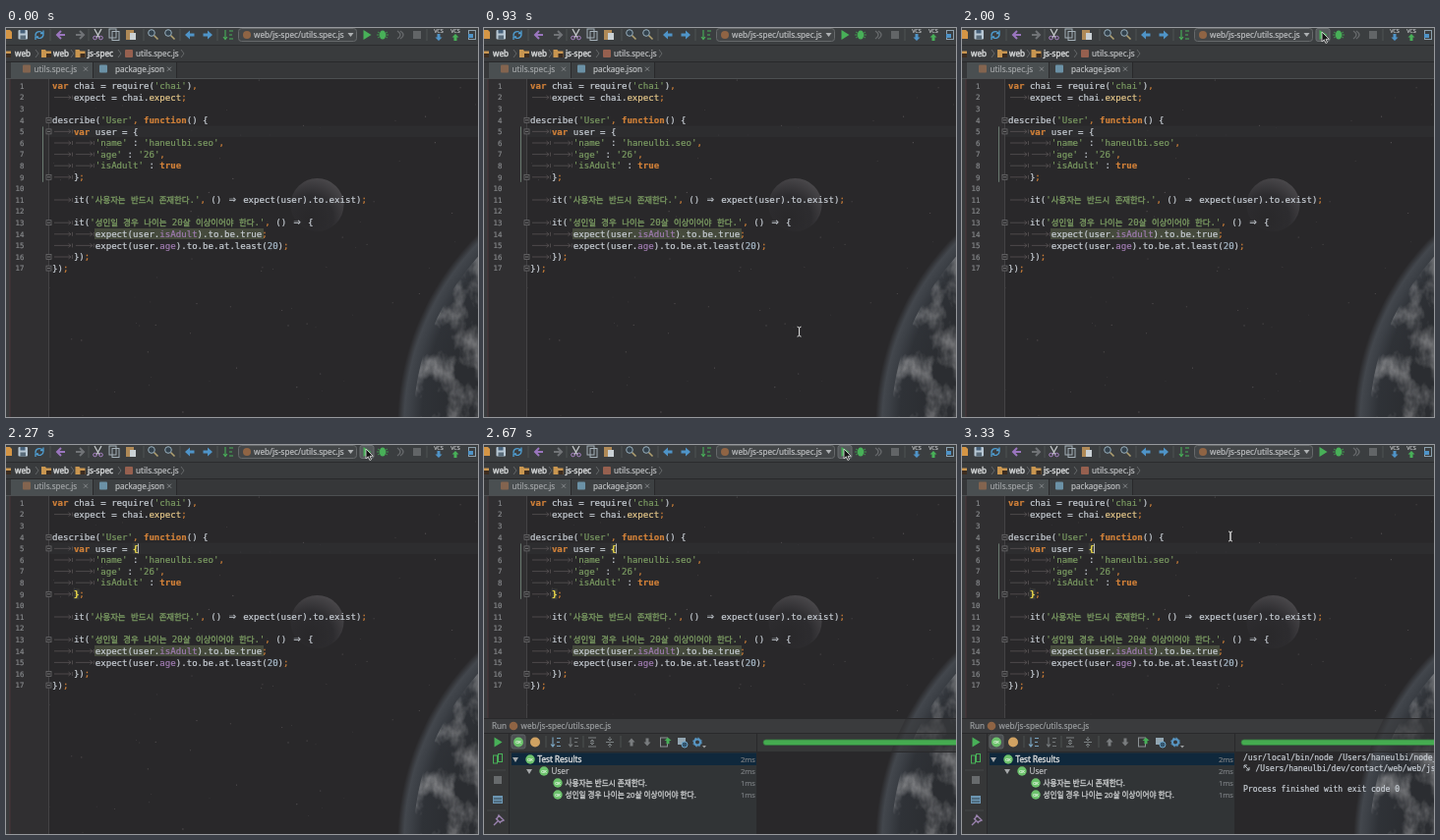
Recreate the animation shown at these times as an HTML page. Size 480 px wide and 396 px high, loop 3390 ms.

```html
<!DOCTYPE html>
<html lang="ko">
<head>
<meta charset="utf-8">
<title>Running a test from the editor</title>
<style>
  html, body { margin: 0; height: 100%; overflow: hidden; background: #29282a; }
  svg { display: block; width: 480px; height: 396px; }
  svg svg { width: auto; height: auto; }
  text { white-space: pre; font: 8.15px "Noto Sans", "Noto Sans CJK KR", "Noto Sans CJK JP", sans-serif; color: #bcbec0; }
  text, tspan { fill: currentColor; stroke: currentColor; stroke-width: .2; }
  .code { font: 9.09px "DejaVu Sans Mono", "Noto Sans CJK KR", "Noto Sans CJK JP", monospace; color: #c8ced5; }
  .out { font-size: 8px; }
  .num { font-size: 7.4px; color: #85878a; text-anchor: end; }
  .strong { stroke-width: .45; color: #d2d4d5; }
  .dim { color: #999c9e; }
  .ko { font-size: 7.65px; stroke-width: .3; color: #c8cacb; }
  .ms { font-size: 7.6px; color: #777b7e; text-anchor: end; }
  .mini { font-size: 4px; color: #e4f3e2; text-anchor: middle; }
  .vcs { font-size: 5.5px; text-anchor: middle; }
  .match { color: #f2df4b; font-weight: bold; }
  .k { color: #d08039; font-weight: bold; }
  .o { color: #d08039; }
  .s { color: #7b9b62; }
  .f { color: #e6c88a; }
  .p { color: #a07cb2; }
  .n { color: #a9bccb; }
  .h { font-size: 8.4px; stroke-width: .3; }
</style>
</head>
<body>
<svg id="stage" viewBox="0 0 480 396">
  <defs>
    <radialGradient id="moon" cx=".36" cy=".76" r=".8">
      <stop offset="0" stop-color="#29282a"/><stop offset=".55" stop-color="#2d2c2f"/><stop offset="1" stop-color="#4a484b"/>
    </radialGradient>
    <radialGradient id="planet" gradientUnits="userSpaceOnUse" cx="672" cy="405" r="274">
      <stop offset=".8" stop-color="#2b2d31"/><stop offset=".91" stop-color="#2f3237"/>
      <stop offset=".95" stop-color="#3c4046"/><stop offset=".975" stop-color="#43474d"/>
      <stop offset="1" stop-color="#29282a"/>
    </radialGradient>
    <filter id="clouds" x="0" y="0" width="1" height="1">
      <feTurbulence type="fractalNoise" baseFrequency=".045 .03" numOctaves="4" seed="5"/>
      <feColorMatrix values="0 0 0 0 .46  0 0 0 0 .46  0 0 0 0 .47  2.6 0 0 0 -1.15"/>
    </filter>
    <clipPath id="disc"><circle cx="672" cy="405" r="258"/></clipPath>
  </defs>
</svg>
<script>
const stage = document.getElementById('stage');
const LOOP = 3390, STEP = 200 / 3, CELL = 5.47;

const rect = (x, y, w, h, fill, extra = '') =>
  `<rect x="${x}" y="${y}" width="${w}" height="${h}" fill="${fill}" ${extra}/>`;
const dot = (x, y, r, fill, extra = '') => `<circle cx="${x}" cy="${y}" r="${r}" fill="${fill}" ${extra}/>`;
const text = (x, y, str, cls = '') => `<text x="${x}" y="${y}" class="${cls}">${str}</text>`;
const fillPath = (d, fill) => `<path d="${d}" fill="${fill}"/>`;
const line = (d, color, w = 1) => `<path d="${d}" fill="none" stroke="${color}" stroke-width="${w}"/>`;
const group = (id, body) => `<g id="${id}">${body}</g>`;
const crop = (x, y, w, h, body) =>
  `<svg x="${x}" y="${y}" width="${w}" height="${h}" style="width:${w}px;height:${h}px" viewBox="${x} ${y} ${w} ${h}">${body}</svg>`;
const rowY = n => 59 + (n - 1) * 11.6;

// Tokens are split by | and start with a one-letter style.
function code(n, indent, src) {
  const spans = src.split('|').map(tok => {
    const body = tok.slice(1)
      .replace(/[가-힣]+/g, '<tspan class="h">$&</tspan>')
      .replace('⇒ ', '<tspan dx="1.9" font-size="12">⇒</tspan><tspan dx="1.8"> </tspan>');
    return `<tspan class="${tok[0]}">${body}</tspan>`;
  }).join('');
  let marks = '';
  for (let i = 0; i < indent; i++) {
    const x = 47 + i * 4 * CELL, y = rowY(n);
    marks += line(`M${x + 2} ${y}h17M${x + 16.5} ${y - 2}l2.5 2l-2.5 2M${x + 20.5} ${y - 2}v4`, '#5d5859', .7);
  }
  return marks + text(47 + indent * 4 * CELL, rowY(n) + 3.1, spans, 'code');
}

function stars() {
  let seed = 7, out = '';
  const rnd = () => (seed = seed * 16807 % 2147483647) / 2147483647;
  for (let i = 0; i < 90; i++)
    out += dot((44 + rnd() * 436).toFixed(1), (52 + rnd() * 344).toFixed(1), (.3 + rnd() * .35).toFixed(2), '#6b6567', 'opacity=".7"');
  return out;
}

const planet = dot(672, 405, 274, 'url(#planet)') +
  `<g clip-path="url(#disc)">${rect(400, 190, 80, 206, '#777', 'filter="url(#clouds)" opacity=".6"')}</g>`;

const folder = (x, y) => fillPath(`M${x} ${y}h4l1 1.5h5v6.5h-10z`, '#c99650') + rect(x + 5, y + 4, 5, 4, '#3d2d20');
const fileIcon = (x, y, color) => rect(x, y, 8, 8, color, 'rx="1"');
const chevron = (x, y) => line(`M${x} ${y - 4}l3 4l-3 4`, '#696c6e', .9);
const cross = (x, y) => line(`M${x - 2} ${y - 2}l4 4m0-4l-4 4`, '#8b8e90', .9);
const play = (x, y) => fillPath(`M${x - 3.5} ${y - 5}l8 5l-8 5z`, '#48b058');
const arrowL = (x, y, c) => fillPath(`M${x - 5} ${y}l5-4.5v3h4.5v3h-4.5v3z`, c);
const arrowR = (x, y, c) => fillPath(`M${x + 5} ${y}l-5-4.5v3h-4.5v3h4.5v3z`, c);
const arrowV = (x, y, s, c) => fillPath(`M${x} ${y + 4 * s}l-3.5 ${-4 * s}h2v${-4 * s}h3v${4 * s}h2z`, c);
const page = (x, y, c) => rect(x - 3.5, y - 4.5, 7, 9, 'none', `stroke="${c}"`);
const lens = (x, y) => line(`M${x + 1.5} ${y + 1.5}l4 4`, '#b0a070', 1.6) + dot(x - 1, y - 1, 3.3, '#33424d', 'stroke="#9ab0bd"');
const sep = (x, y) => line(`M${x} ${y - 6}v12`, '#55585a', .8);
const ring = (x, y, c) => line(`M${x - 4} ${y + 1}a4 4 0 0 1 7-3m1 1a4 4 0 0 1-7 3M${x + 4} ${y - 4.5}v3.2h-3M${x - 4} ${y + 5}v-3h3`, c, 1.3);
const sorter = (x, y, c) => line(`M${x - 3} ${y - 5}v9m-2-2l2 2.5l2-2.5M${x + 1} ${y - 4}h4M${x + 1} ${y}h3M${x + 1} ${y + 4}h4`, c, 1.1);
const bug = (x, y) => line(`M${x - 5} ${y - 3}l10 6m0-6l-10 6m-1-3h12`, '#3f944c', 1) + `<ellipse cx="${x}" cy="${y}" rx="3" ry="4.5" fill="#48b058"/>`;
const ok = (x, y, r = 4.7) => dot(x, y, r, '#6cc26c') + text(x, y + 1.5, 'OK', 'mini');
const vcs = (x, arrow) => text(x, 5, 'VCS', 'vcs') + arrow;

const toolbar = rect(0, 0, 480, 18, '#3b3e40') + line('M0 17.5h480', '#2b2c2e') +
  fillPath('M0 2h4l2 2v7h-6z', '#d49545') +
  rect(12.5, 2, 9.5, 9.5, '#b8c8d4', 'rx="1"') + rect(14.5, 2, 5, 3.5, '#47617a') + rect(14.5, 7.5, 5.5, 4, '#596b79') +
  ring(34, 7, '#4f9dd0') + sep(45, 7) +
  line('M53 7h7m-4-4l-4 4l4 4', '#9a75be', 2) + line('M78 7h-7m4-4l4 4l-4 4', '#707376', 2) + sep(84, 7) +
  line('M90 1l5 9m2-9l-5 9', '#c4c8ca', 1.3) + dot(90.5, 10, 1.8, 'none', 'stroke="#a882c4"') + dot(96.5, 10, 1.8, 'none', 'stroke="#a882c4"') +
  page(108.5, 5.5, '#a4b0b8') + page(111.5, 8, '#a4b0b8') +
  rect(122, 2, 8, 10, '#b08a57') + rect(126, 5, 6, 7, '#cad1d5') + sep(140, 7) +
  lens(149, 6) + lens(166, 6) + sep(177, 7) +
  arrowL(187, 7, '#4f94c8') + arrowR(205, 7, '#4f94c8') + sep(215, 7) +
  sorter(226, 7, '#48b058') +
  rect(236.5, .5, 120, 13, '#434648', 'rx="3" stroke="#66696b"') + dot(245, 7, 4, '#8f6444') +
  text(252, 9.8, 'web/js-spec/utils.spec.js') + fillPath('M347.5 5h6l-3 4z', '#aeb1b3') +
  group('hover', rect(360, .5, 14, 13, '#55595b', 'rx="2" stroke="#6b6f71"')) +
  play(367, 7) + bug(383, 7) +
  line('M398 3q6 4 0 8m3-8q6 4 0 8', '#66696b', 1.4) + rect(414, 3, 8, 8, '#626567') + sep(428, 7) +
  vcs(440, arrowV(440, 9.5, .9, '#4f94c8')) + vcs(457, arrowV(457, 9.5, -.9, '#48b058')) +
  page(474, 7, '#8ba0ad') + rect(470, 6, 5, 4, '#4f94c8');

const crumbs = rect(0, 18, 480, 17, '#393b3d') + line('M0 34.5h480', '#28292b') +
  folder(-5, 22) + text(9, 29.2, 'web', 'strong') + chevron(30, 26) +
  folder(36, 22) + text(48, 29.2, 'web', 'strong') + chevron(66, 26) +
  folder(70.5, 22) + text(83, 29.2, 'js-spec', 'strong') + chevron(114, 26) +
  fileIcon(121, 22, '#96604f') + text(132, 29.2, 'utils.spec.js') + chevron(178, 26);

const tabs = rect(0, 35, 480, 17, '#363739') + rect(5, 35, 83, 17, '#4a4f51') + rect(89, 35, 84, 17, '#3d4042') +
  line('M88.5 35v17M173.5 35v17', '#29292b') + line('M0 51.5h480', '#4c4f51') +
  fileIcon(17, 37.5, '#83644f') + `<g opacity=".75">${text(28.5, 44.7, 'utils.spec.js')}</g>` + cross(81, 41.7) +
  fileIcon(95, 37.5, '#6b91a6') + text(111, 44.7, 'package.json') + cross(166, 41.7);

let gutter = rect(0, 52, 44, 344, '#302f31') + rect(0, 52, 4, 344, '#393b3d') + line('M4 52v344', '#54373a', .8) +
  line('M43.5 52v344', '#4b4a4b', .8);
for (let n = 1; n <= 17; n++) gutter += text(18.5, rowY(n) + 2.7, n, 'code num');
for (const n of [4, 5, 9, 13, 16, 17])
  gutter += rect(41, rowY(n) - 2.5, 5, 5, '#2d2c2e', 'stroke="#727274" stroke-width=".7"') + line(`M42 ${rowY(n)}h3`, '#929294', .7);

const scope = line(`M37.5 ${rowY(5) - 5}V${rowY(9) + 5}`, '#6b7a70');

const editor = rect(44, 52, 436, 344, '#29282a') + stars() + dot(316.5, 180, 27, 'url(#moon)') + planet +
  rect(44, 99.5, 436, 11.6, '#303032', 'opacity=".7"') + gutter +
  rect(90, 204, 172, 11, '#454a3c') +
  code(1, 0, "kvar |wchai = require(|s'chai'|w)|o,") +
  code(2, 1, 'wexpect = chai.|fexpect|o;') +
  code(4, 0, "wdescribe(|s'User'|o, |kfunction|w() {") +
  code(5, 1, 'kvar |wuser = {') +
  code(6, 2, "s'name'|w : |s'haneulbi.seo'|o,") +
  code(7, 2, "s'age'|w : |s'26'|o,") +
  code(8, 2, "s'isAdult'|w : |ktrue") +
  code(9, 1, 'w}|o;') +
  code(11, 1, "wit(|s'사용자는 반드시 존재한다.'|o, |w() ⇒ expect(user).to.exist)|o;") +
  code(13, 1, "wit(|s'성인일 경우 나이는 20살 이상이어야 한다.'|o, |w() ⇒ {") +
  code(14, 2, 'wexpect(user.|pisAdult|w).to.be.true|o;') +
  code(15, 2, 'wexpect(user.|page|w).to.be.at.least(|n20|w)|o;') +
  code(16, 1, 'w})|o;') + code(17, 0, 'w})|o;');

const brace = (n, col, ch) => {
  const x = 47 + col * CELL;
  return rect(x - .3, rowY(n) - 5.5, CELL + .6, 11, '#3a3b38') + text(x, rowY(n) + 3.1, ch, 'code match');
};
const braces = brace(5, 15, '{') + brace(9, 4, '}') + line(`M${47 + 16 * CELL} ${rowY(5) - 5}v10`, '#d0d0d0', .9);

const panelBase = rect(0, 278, 480, 118, '#363738') + rect(0, 278, 480, 15, '#3a3b3d') +
  crop(278, 279, 202, 34, `<g opacity=".4">${planet}</g>`) +
  line('M0 278.5h480M0 293.5h480', '#29292b') +
  text(8, 288.8, 'Run', 'dim') + dot(30, 286, 4.3, '#8f6444') + text(37.5, 288.8, 'web/js-spec/utils.spec.js', 'dim') +
  rect(278, 313, 202, 83, '#29282a') + crop(278, 313, 202, 83, planet) +
  rect(26, 313, 251, 83, '#313436') + line('M25.5 293v103M277.5 293v103M25 312.5h455', '#29292b') +
  rect(28, 295, 14, 14, '#4c5052', 'rx="2" stroke="#5e6264"') + ok(35, 302.5, 5) + dot(52, 302.5, 5, '#d0a262') + sep(63, 302) +
  sorter(73, 302.5, '#7aa4c0') + sorter(91, 302.5, '#74787a') + sep(101, 302) +
  line('M106 298h8m-8 9h8M110 300v5m-2-3l2-2l2 2m-4 1l2 2l2-2', '#84898c', .9) +
  line('M124 302.5h8M128 297v4m-2-2l2 2l2-2M128 308v-4m-2 2l2-2l2 2', '#84898c', .9) + sep(139, 302) +
  arrowV(150, 302.5, -1, '#797c7e') + arrowV(166, 302.5, 1, '#797c7e') +
  page(183, 302.5, '#8b9194') + arrowV(187, 301, -.8, '#48b058') +
  rect(197, 298, 8, 7, '#93a6b2') + dot(204, 305, 3, '#35566e', 'stroke="#6ca5ca"') +
  dot(217, 302.5, 3, 'none', 'stroke="#5897c4" stroke-width="2"') + dot(217, 302.5, 4.4, 'none', 'stroke="#5897c4" stroke-dasharray="1.8 1.65"') +
  fillPath('M222 306h4l-2 2.5z', '#9b9ea0') +
  rect(9.5, 316, 4, 8, 'none', 'stroke="#48b058"') + rect(14.5, 314.5, 4, 8, 'none', 'stroke="#48b058"') +
  rect(9, 357, 10, 8, '#6c95b2') + line('M10 360h8m-8 3h8', '#32444f') +
  line('M10 387l4-4m-2-3l5 5m-2-8l5 5l-4 2l-3-3z', '#9a82ae', 1.4) +
  line('M3 331h19M3 372h19', '#47494b', .8);

const pending = ring(14, 302.5, '#48b058') + rect(10, 337, 8, 8, '#b7654f') +
  dot(47, 320, 4.5, '#c79b4a') + dot(48, 320.5, 2, '#4c3a22') + text(54.5, 322.8, 'Instantiating tests...') +
  rect(284, 300, 204, 5.5, '#303532', 'rx="2.7" stroke="#4b8b54" stroke-width=".8"');

const fold = (x, y) => fillPath(`M${x - 3} ${y - 2}h6l-3 5z`, '#a5a8aa');
const result = (x, y, label, cls, ms) => ok(x, y) + text(x + 7.5, y + 2.9, label, cls) + text(276, y + 2.9, ms, 'ms');
const results = play(14, 302.5) + rect(10, 337, 8, 8, '#686b6d') +
  rect(28, 313.5, 249, 12.5, '#0f283c') + fold(32, 320) + result(47, 320, 'Test Results', 'strong', '2ms') +
  fold(46, 332) + result(61, 332, 'User', '', '2ms') +
  result(75, 344, '사용자는 반드시 존재한다.', 'ko', '1ms') +
  result(75, 356, '성인일 경우 나이는 20살 이상이어야 한다.', 'ko', '1ms') +
  rect(284, 300, 204, 5.5, '#45ac50', 'rx="2.7" stroke="#35783f" stroke-width=".8"');

const consoleText = text(286, 320.8, '/usr/local/bin/node /Users/haneulbi/node_modules', 'code out') +
  line('M287 326l5 5m-5-2v-3h3m2 2v3h-3', '#b9bfc5', 1) +
  text(298.5, 331.5, '/Users/haneulbi/dev/contact/web/web/js-spec', 'code out') +
  text(286, 352.5, 'Process finished with exit code 0', 'code out');

const pointer = group('pointer',
  group('arrow', '<path d="M0 0v10l2.3-2.2 1.6 3.7 1.6-.7-1.5-3.5h3.3z" fill="#151515" stroke="#d2d2d2" stroke-width=".9"/>') +
  group('beam', line('M-2 -5q2 0 2 2v6q0 2 -2 2M2 -5q-2 0 -2 2v6q0 2 2 2', '#d8d8d8', 1)));

stage.insertAdjacentHTML('beforeend', editor + group('scope', scope) + group('braces', braces) + toolbar + crumbs + tabs +
  group('panel', panelBase + group('pending', pending) + group('results', results) + group('console', consoleText)) + pointer);

const part = Object.fromEntries([...stage.querySelectorAll('g[id]')].map(g => [g.id, g]));
const show = (id, on) => part[id].style.display = on ? '' : 'none';

// time, x, y
const path = [[860, 318, 330], [1330, 356, 19], [1530, 366, 4], [2870, 366, 4], [3270, 273, 93], [LOOP, 273, 93]];
function pointerAt(t) {
  const i = Math.max(1, path.findIndex(p => p[0] > t));
  const [a, b] = [path[i - 1], path[i]];
  const u = Math.min(1, Math.max(0, (t - a[0]) / (b[0] - a[0])));
  const e = u * u * (3 - 2 * u);
  return [a[1] + (b[1] - a[1]) * e, a[2] + (b[2] - a[2]) * e];
}

function draw(now) {
  const t = Math.floor((now % LOOP + 5) / STEP) * STEP + 1;
  const [x, y] = pointerAt(t);
  show('pointer', t >= 860);
  part.pointer.setAttribute('transform', `translate(${x} ${y})`);
  show('arrow', y < 52);
  show('beam', y >= 52);
  show('hover', t > 1460 && x > 360 && y < 14);
  show('braces', t > 2130);
  show('scope', t < 2130 || t >= 2530);
  show('panel', t > 2325);
  show('pending', t < 2530);
  show('results', t >= 2530);
  show('console', t > 2860);
}

const start = performance.now();
function tick() {
  draw(performance.now() - start);
  requestAnimationFrame(tick);
}
tick();
</script>
</body>
</html>
```
